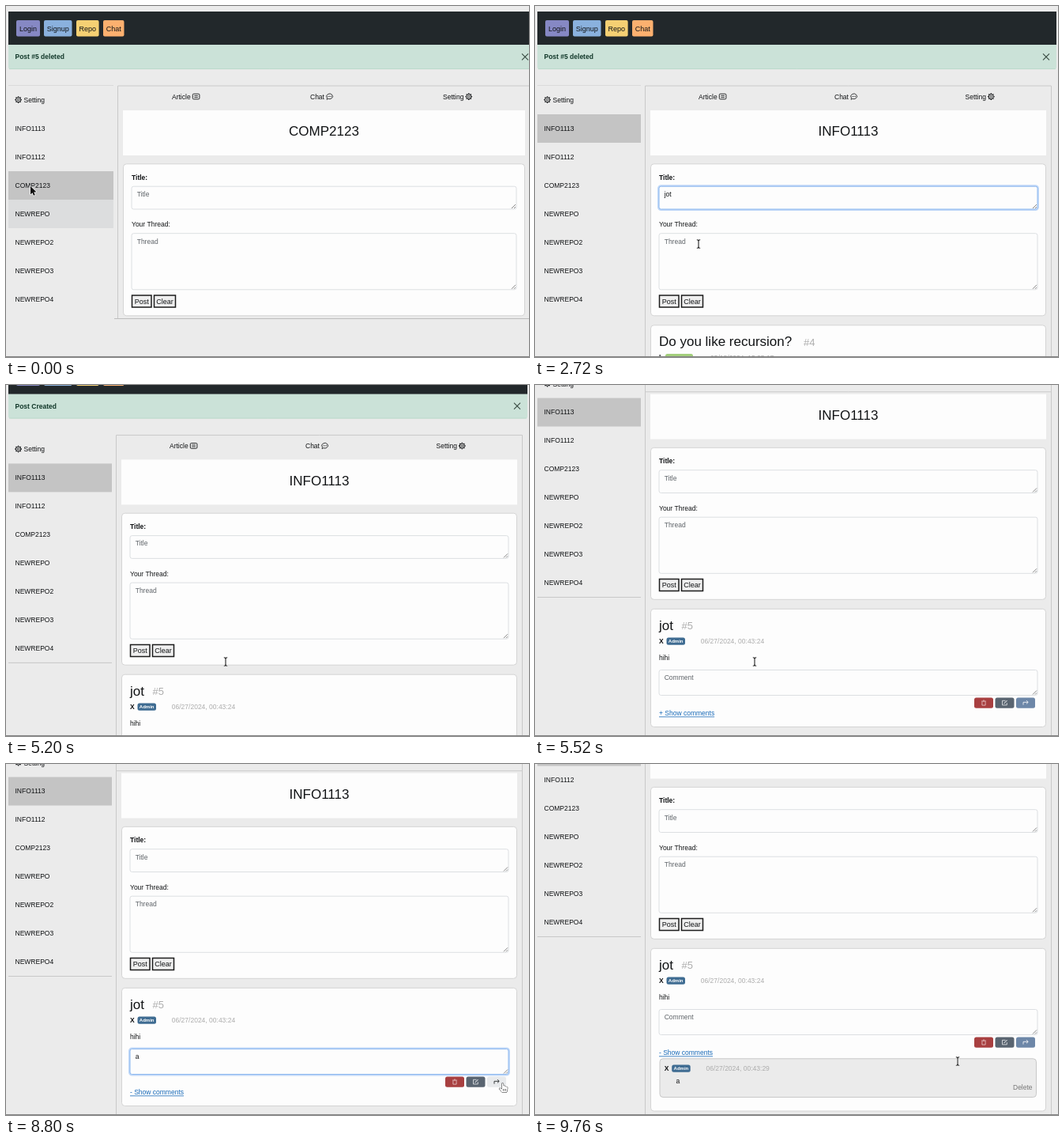
Recreate the animation shown at these times as an HTML page with a canvas. Size 662 px wide and 444 px high, loop 9840 ms.

```html
<!DOCTYPE html>
<html lang="en">
<head>
<meta charset="utf-8">
<title>Forum posting demo</title>
<style>
html, body { margin: 0; width: 100%; height: 100%; overflow: hidden; background: #ebebeb; }
canvas { display: block; width: 662px; height: 444px; }
</style>
</head>
<body>
<canvas id="stage"></canvas>
<script>
const W = 662, H = 444, LOOP = 9840, STEP = 80;
const FONT = '"Liberation Sans", Arial, Helvetica, sans-serif';
const BG = '#ebebeb', PANEL = '#fdfdfd', INK = '#111315', LINE = '#c6c6c6', MUTED = '#5f6469', PALE = '#adadad';
const canvas = document.getElementById('stage');
const ctx = canvas.getContext('2d');
const dpr = window.devicePixelRatio || 1;
canvas.width = W * dpr;
canvas.height = H * dpr;

const POST_TITLE = 'jot', POST_TEXT = 'hihi';
const REPOS = ['INFO1113', 'INFO1112', 'COMP2123', 'NEWREPO', 'NEWREPO2', 'NEWREPO3', 'NEWREPO4'];

// Moments of the story, in ms
const AT = {
  open: 720, titleFocus: 1680, titleType: 1920, threadFocus: 2800, threadType: 3040,
  posted: 4480, expand: 6560, commentFocus: 7360, commentType: 7600, hoverSend: 8720, commented: 8960, leaveSend: 9120
};

const WIDE = { side: 136, edge: 141.5, x: 148, r: 657, close: 657, end: 672, frame: 664, tabs: [210, 385, 553] };
const NARROW = { side: 134, edge: 139.5, x: 146, r: 647, close: 647, end: 660, frame: 653.5, tabs: [207, 379, 544.5] };

// time, x, y, pointer shape
const POINTER = [
  [0, 31, 228, 'arrow'], [80, 31, 228, 'hand'], [480, 32, 152, 'hand'], [1000, 32, 152, 'arrow'],
  [1520, 196, 241, 'beam'], [1920, 196, 241, 'none'], [2400, 196, 241, 'beam'], [2640, 207, 301, 'beam'],
  [3040, 207, 301, 'none'], [3760, 207, 301, 'beam'], [4240, 174, 367, 'hand'], [4720, 174, 367, 'hand'],
  [4800, 182, 366, 'arrow'], [5040, 278, 350, 'beam'], [6000, 278, 350, 'beam'], [6480, 190, 413, 'hand'],
  [6800, 190, 413, 'hand'], [6880, 215, 409, 'beam'], [7200, 459, 376, 'beam'], [7600, 459, 376, 'none'],
  [8000, 459, 376, 'beam'], [8720, 628.5, 404, 'hand'], [9040, 628.5, 404, 'hand'], [9120, 612, 397, 'beam'],
  [9360, 535, 376, 'beam']
];
const SCROLL = [
  [0, 0], [5040, 0], [5120, 13], [5200, 37.6], [5280, 72], [5360, 97], [5440, 113], [5520, 120.5],
  [9520, 120.5], [9600, 131], [9680, 155], [9760, 170.5]
];

function sample(keys, t) {
  let i = keys.length - 1;
  while (i > 0 && keys[i][0] > t) i--;
  const a = keys[i], b = keys[i + 1] || a;
  const u = b === a ? 0 : (t - a[0]) / (b[0] - a[0]);
  const k = u * u * (3 - 2 * u);
  return a.map((v, n) => typeof v === 'number' ? v + (b[n] - v) * k : v);
}

const typed = (word, start, t) => t < start ? '' : word.slice(0, 1 + Math.floor((t - start) / 160));
const within = (t, a, b) => t >= a && t < b;

function text(s, x, cy, color = INK, size = 8.5, weight = 'normal', align = 'left') {
  ctx.font = `${weight} ${size}px ${FONT}`;
  ctx.textAlign = align;
  ctx.fillStyle = color;
  ctx.fillText(s, x, cy + size * 0.36);
}
const bold = (s, x, cy, color, size) => text(s, x, cy, color, size, 'bold');

function rect(x, y, r, b, color) {
  ctx.fillStyle = color;
  ctx.fillRect(x, y, r - x, b - y);
}

function box(x, y, r, b, radius, fill, stroke, width = 1) {
  ctx.beginPath();
  ctx.roundRect(x, y, r - x, b - y, radius);
  if (fill) { ctx.fillStyle = fill; ctx.fill(); }
  if (stroke) { ctx.strokeStyle = stroke; ctx.lineWidth = width; ctx.stroke(); }
}

// Polyline from a flat list of coordinates
function line(pts, color = LINE, width = 1) {
  ctx.beginPath();
  for (let i = 0; i < pts.length; i += 2) ctx.lineTo(pts[i], pts[i + 1]);
  ctx.strokeStyle = color;
  ctx.lineWidth = width;
  ctx.stroke();
}

function ring(x, y, r, color, width) {
  ctx.beginPath();
  ctx.arc(x, y, r, 0, Math.PI * 2);
  ctx.strokeStyle = color;
  ctx.lineWidth = width;
  ctx.stroke();
}

function gear(x, y) {
  ring(x, y, 3.1, INK, 1);
  ring(x, y, 1.3, INK, 0.8);
  for (let i = 0; i < 8; i++) {
    const c = Math.cos(i * Math.PI / 4), s = Math.sin(i * Math.PI / 4);
    line([x + c * 3.2, y + s * 3.2, x + c * 4.3, y + s * 4.3], INK, 1.3);
  }
}

function noteIcon(x, y) {
  box(x, y - 3.3, x + 8.6, y + 3.3, 1.2, null, INK, 0.9);
  line([x + 2, y - 1, x + 6.6, y - 1], INK, 0.8);
  line([x + 2, y + 1, x + 6.6, y + 1], INK, 0.8);
}

function bubbleIcon(x, y) {
  ctx.beginPath();
  ctx.ellipse(x + 4.3, y - 0.2, 3.9, 3.3, 0, Math.PI * 0.8, Math.PI * 2.65);
  ctx.lineTo(x + 0.8, y + 3.8);
  ctx.closePath();
  ctx.strokeStyle = INK;
  ctx.lineWidth = 0.8;
  ctx.stroke();
  for (let i = 0; i < 3; i++) rect(x + 2 + i * 1.9, y - 0.6, x + 3 + i * 1.9, y + 0.4, INK);
}

function field(x, y, r, b, value, hint, focus) {
  if (focus) {
    box(x - 0.5, y - 0.5, r + 0.5, b + 0.5, 3, null, '#c0d8f8', 3);
    box(x, y, r, b, 2.5, PANEL, '#8db8ef');
  } else {
    box(x, y, r, b, 2.5, PANEL, '#dcdfe2');
  }
  text(value || hint, x + 6.7, y + 9.8, value ? INK : MUTED);
  line([r - 6, b - 1, r - 1, b - 6], '#666', 0.8);
  line([r - 3, b - 1, r - 1, b - 3], '#666', 0.8);
}

function plainButton(label, x, r) {
  box(x, 366, r, 381, 0, '#efefef', '#1c1c1c', 1.5);
  text(label, (x + r) / 2, 373.4, INK, 9, 'normal', 'center');
}

function author(x, y, date) {
  bold('X', x, y);
  box(x + 9.5, y - 4.6, x + 33, y + 4.6, 2.5, '#3f6c92');
  text('Admin', x + 21.2, y, '#fff', 6, 'bold', 'center');
  text(date, x + 52.8, y, PALE);
}

function header(L, t) {
  rect(3, 7, L.end, 49.5, '#22282b');
  [['Login', 13, 43, '#8688c4'], ['Signup', 48, 83.5, '#8ab1de'], ['Repo', 89, 117.6, '#f5d073'], ['Chat', 123, 149.5, '#fcb06f']]
    .forEach(([label, x, r, color]) => {
      box(x, 18, r, 38.5, 2, color);
      text(label, (x + r) / 2, 28.3, INK, 9, 'normal', 'center');
    });
  box(3, 49, L.end, 80, [0, 0, 3, 3], '#cbe2d8');
  line([4, 79.6, L.end - 1, 79.6], '#b7d6c7', 0.8);
  bold(t < AT.posted ? 'Post #5 deleted' : 'Post Created', 11.5, 64.3, '#12382a');
  const c = L.close;
  line([c - 4, 60.3, c + 4, 68.3], '#35463e', 1.1);
  line([c + 4, 60.3, c - 4, 68.3], '#35463e', 1.1);
}

function sidebar(L, t, scroll, p) {
  const active = t < AT.open ? 2 : 0;
  const over = p[1] < L.side ? Math.floor((p[2] + scroll - 137) / 36) : -1;
  REPOS.forEach((name, i) => {
    const y = 137 + i * 36;
    const lit = (t < AT.open && i === 3) || i === over;
    if (i === active) rect(3, y, L.side, y + 36, '#c4c4c4');
    else if (lit) rect(3, y, L.side, y + 36, '#dcddde');
    text(name, 11.5, y + 17.6);
  });
  gear(15.6, 118.6);
  text('Setting', 22.5, 119);
  const edgeY = scroll ? 389 : 100.5;
  line([3, edgeY, L.side, edgeY], scroll ? '#c8c8c8' : '#dadada');
}

function main(L, t, scroll) {
  const { x, r, edge, frame, tabs } = L, wide = L === WIDE;
  const bottom = wide ? 395.5 : 900;
  line([edge, bottom, edge, 101, frame, 101, frame, bottom], '#c9c9c9');
  if (wide) line([137, bottom, frame, bottom], '#bdbdbd');
  if (scroll > 60) line([edge, 129.2, frame, 129.2], '#cccccc');
  text('Article', tabs[0], 114.8);
  noteIcon(tabs[0] + 26.3, 114.5);
  text('Chat', tabs[1], 114.8);
  bubbleIcon(tabs[1] + 20.3, 114.5);
  text('Setting', tabs[2], 114.8);
  gear(tabs[2] + 32.8, 114.6);

  rect(x, 132, r, 189, PANEL);
  text(wide ? REPOS[2] : REPOS[0], (x + r) / 2, 158, INK, 17, 'normal', 'center');

  box(x + 0.5, 199.8, r - 0.5, 391.8, 4, PANEL, '#d4d4d4');
  bold('Title:', x + 11, 216.5);
  field(x + 11, 228.2, r - 11, 257, t < AT.posted ? typed(POST_TITLE, AT.titleType, t) : '', 'Title',
    within(t, AT.titleFocus, AT.threadFocus));
  text('Your Thread:', x + 11, 276.3);
  field(x + 11, 287.7, r - 11, 358.8, t < AT.posted ? typed(POST_TEXT, AT.threadType, t) : '', 'Thread',
    within(t, AT.threadFocus, AT.posted - 160));
  plainButton('Post', x + 11.5, x + 36);
  plainButton('Clear', x + 39.5, x + 66.5);
  if (!wide) t < AT.posted ? olderPost(403.8) : newPost(t);
}

function olderPost(y) {
  box(146.5, y, 646.5, y + 150, 4, PANEL, '#d4d4d4');
  text('Do you like recursion?', 157, y + 20.2, INK, 17);
  text('#4', 340, y + 21.5, PALE, 13);
  bold('k', 157, y + 41);
  box(165, y + 36.2, 200, y + 45.6, 2.5, '#a3cf7c');
  text('05/18/2024, 15:25:17', 222, y + 41, PALE);
}

function action(x, color, draw, ink) {
  box(x, 516, x + 24, 529.3, 2.5, color);
  draw(x + 12, 522.6, ink);
}
function binIcon(x, y, c) {
  line([x - 3, y - 2, x + 3, y - 2], c, 0.8);
  line([x - 2.1, y - 1, x - 2.1, y + 3, x + 2.1, y + 3, x + 2.1, y - 1], c, 0.7);
  line([x - 1, y - 3, x + 1, y - 3], c, 0.7);
}
function editIcon(x, y, c) {
  line([x + 1, y - 2.8, x - 3, y - 2.8, x - 3, y + 2.8, x + 2.8, y + 2.8, x + 2.8, y], c, 0.7);
  line([x - 1, y + 1, x + 3, y - 3], c, 1);
}
function sendIcon(x, y, c) {
  line([x - 3, y + 2.5, x - 3, y - 0.8, x + 3, y - 0.8], c, 0.8);
  line([x + 1, y - 3, x + 3.2, y - 0.8, x + 1, y + 1.3], c, 0.8);
}

function newPost(t) {
  const done = t >= AT.commented, bottom = done ? 609.5 : 553;
  box(146.5, 403.8, 646.5, bottom, 4, PANEL, '#d4d4d4');
  text(POST_TITLE, 157, 424, INK, 17);
  text('#5', 185.5, 425.3, PALE, 13);
  author(157, 444.7, '06/27/2024, 00:43:24');
  text(POST_TEXT, 157, 465.8);
  field(157, 481, 636, 513, done ? '' : typed('a', AT.commentType, t), 'Comment', within(t, AT.commentFocus, AT.commented));
  const hot = within(t, AT.hoverSend, AT.leaveSend);
  action(556, '#a83f40', binIcon, '#f3dede');
  action(582.5, '#596470', editIcon, '#fff');
  action(609, hot ? '#e8eaec' : '#6d87a8', sendIcon, hot ? INK : '#fff');
  const link = (t < AT.expand ? '+' : '-') + ' Show comments';
  text(link, 157, 535.8, '#1769b8');
  const end = 157 + ctx.measureText(link).width;
  line([157, 540.3, end, 540.3], '#1769b8', 0.8);
  if (done) {
    box(158, 543.3, 634.5, 592, 4, '#ebebeb', '#c8c8c8');
    author(163.7, 555.7, '06/27/2024, 00:43:29');
    text('a', 178.5, 571.6);
    text('Delete', 605, 579.4, '#777');
  }
  box(146.5, bottom + 11, 646.5, bottom + 160, 4, PANEL, '#d4d4d4');
}

const SHAPES = {
  arrow: 'M0 0L0 10.4L2.4 8.2L4 11.8L5.8 11L4.2 7.5L7.4 7.2Z',
  hand: 'M-1 0Q0 -1 1 0L1.3 3.4Q2.4 2.6 3.1 3.8Q4.3 3.2 4.8 4.4Q6.3 4 6.3 5.8L6 8.5L5 11.5L-0.5 11.5L-3.8 7.4Q-4.4 5.6 -2.6 6.1L-1 7.4Z'
};

function pointer([, x, y, kind]) {
  if (kind === 'none') return;
  if (kind === 'beam') {
    const bar = (c, w) => {
      line([x, y - 4.5, x, y + 4.5], c, w);
      line([x - 2.2, y - 5.2, x - 0.8, y - 5, x, y - 4.3, x + 0.8, y - 5, x + 2.2, y - 5.2], c, w);
      line([x - 2.2, y + 5.2, x - 0.8, y + 5, x, y + 4.3, x + 0.8, y + 5, x + 2.2, y + 5.2], c, w);
    };
    bar('#fff', 2.2);
    bar('#222', 1.1);
    return;
  }
  const shape = new Path2D(SHAPES[kind]), isHand = kind === 'hand';
  ctx.save();
  ctx.translate(x, y);
  ctx.lineJoin = 'round';
  ctx.lineWidth = isHand ? 1 : 1.3;
  ctx.strokeStyle = isHand ? '#111' : '#fff';
  ctx.fillStyle = isHand ? '#fff' : '#111';
  ctx.stroke(shape);
  ctx.fill(shape);
  if (isHand) for (let i = 0; i < 3; i++) line([0.8 + i * 1.6, 7, 0.8 + i * 1.6, 9.6], '#333', 0.6);
  ctx.restore();
}

function draw(now) {
  const t = Math.floor((now % LOOP) / STEP) * STEP;
  const L = t < AT.open ? WIDE : NARROW;
  const scroll = sample(SCROLL, t)[1], p = sample(POINTER, t);
  ctx.setTransform(dpr, 0, 0, dpr, 0, 0);
  rect(0, 0, W, H, BG);
  ctx.save();
  ctx.translate(0, -scroll);
  header(L, t);
  sidebar(L, t, scroll, p);
  main(L, t, scroll);
  ctx.restore();
  rect(0, 443, W, H, '#858585');
  pointer(p);
}

let start;
function tick(now) {
  if (start === undefined) start = now;
  draw(now - start);
  requestAnimationFrame(tick);
}
draw(0);
requestAnimationFrame(tick);
</script>
</body>
</html>
```
